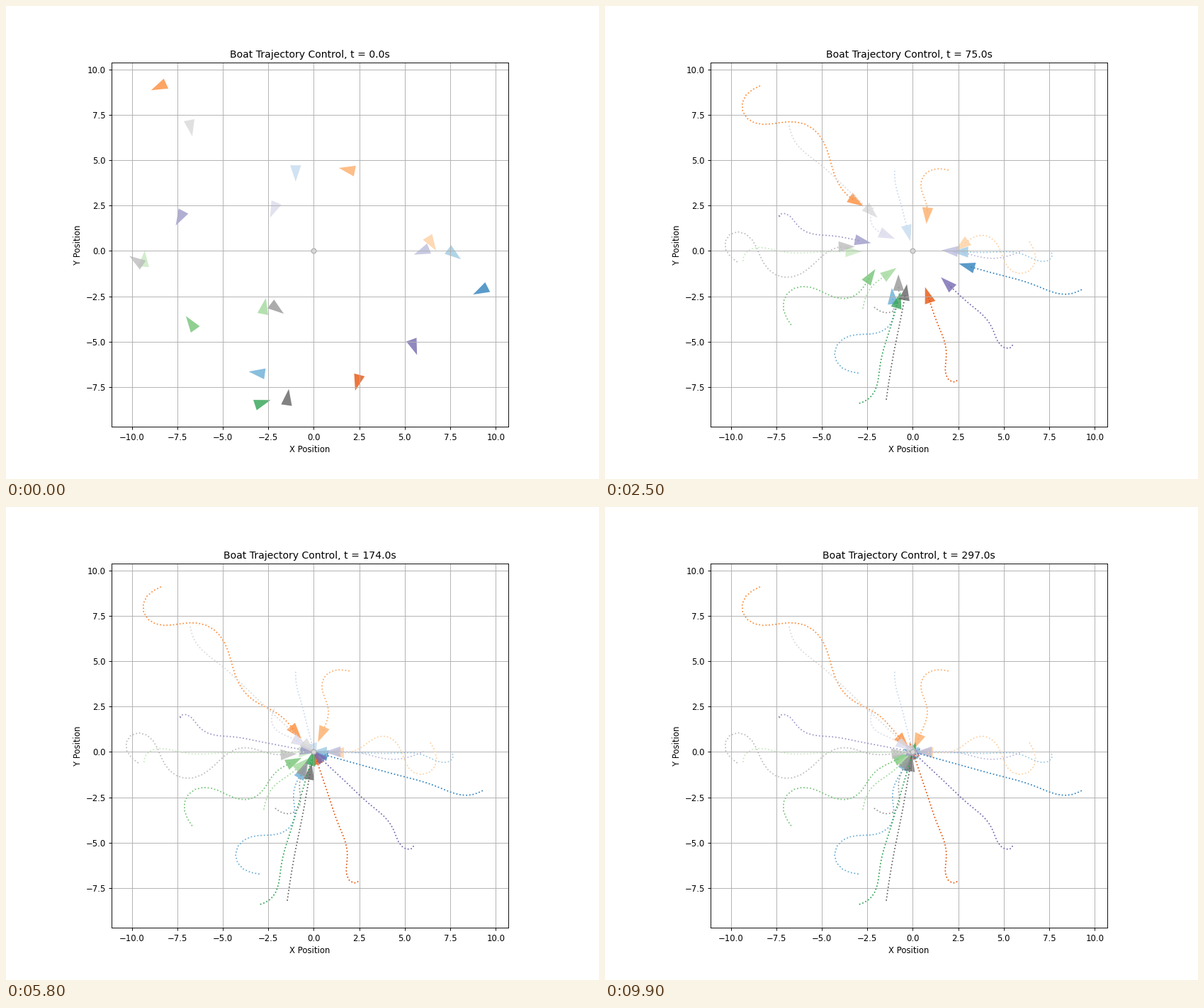
Recreate the animation shown at these times as a matplotlib script. Size 837x669 px, loop 10 s.

```python
import matplotlib.pyplot as plt
import numpy as np
from matplotlib.animation import FuncAnimation

FRAMES, INTERVAL = 100, 100
STEP, SUBSTEPS = 3.0, 30
HULL = np.array([[0.6, 0.0], [-0.3, 0.3], [-0.3, -0.3]])

# x, y, heading in degrees, and the kind of helm
DIRECT, RUDDER = True, False
BOATS = [
    (9.29, -2.13, 207, DIRECT), (-2.99, -6.73, 172, RUDDER),
    (7.61, -0.10, 323, DIRECT), (-1.00, 4.42, -90, DIRECT),
    (2.43, -7.12, 255, DIRECT), (-8.40, 9.10, -156, RUDDER),
    (1.96, 4.46, -191, RUDDER), (6.41, 0.52, -58, RUDDER),
    (-2.95, -8.40, 18, DIRECT), (-6.69, -4.08, 125, RUDDER),
    (-2.75, -3.18, 79, RUDDER), (-9.34, -0.57, 86, DIRECT),
    (5.47, -5.17, 290, DIRECT), (-7.31, 1.93, 242, DIRECT),
    (6.06, 0.02, -158, RUDDER), (-2.17, 2.39, -113, RUDDER),
    (-1.46, -8.20, 82, RUDDER), (-2.13, -3.10, -37, RUDDER),
    (-9.65, -0.61, 146, RUDDER), (-6.80, 6.91, -79, DIRECT),
]


def wrap(a):
    return (a + np.pi) % (2 * np.pi) - np.pi


def simulate():
    """Steer every boat to the origin as a damped, driven heading."""
    x, y, heading, direct = (np.array(c) for c in zip(*BOATS))
    heading = np.radians(heading.astype(float))
    bearing = np.arctan2(-y, -x)
    rate = np.zeros(len(BOATS))
    damping = np.where(direct, 0.17, 0.066)
    dt = STEP / SUBSTEPS
    log = []
    for k in range(FRAMES * SUBSTEPS):
        if k % SUBSTEPS == 0:
            log.append((x, y, heading))
        dist = np.hypot(x, y)
        bearing = bearing + wrap(np.arctan2(-y, -x) - bearing)
        error = bearing - heading
        speed = np.where(
            direct,
            0.12 * np.tanh(dist / 6.2) * (1 + np.cos(error)) / 2,
            np.minimum(0.004 * dist ** 2, 0.157))
        # a rudder only bites while the boat is moving
        gain = np.where(direct, 0.027, 0.1 * speed)
        rate = rate + (gain * error - damping * rate) * dt
        heading = heading + rate * dt
        x = x + speed * np.cos(heading) * dt
        y = y + speed * np.sin(heading) * dt
    return np.array(log).transpose(1, 2, 0)


X, Y, HEADING = simulate()

DPI = 83.7
fig, ax = plt.subplots(figsize=(837.01 / DPI, 669.01 / DPI), dpi=DPI)
ax.set_aspect("equal")
ax.set(xlim=(-11.12, 10.69), ylim=(-9.70, 10.37),
       xlabel="X Position", ylabel="Y Position")
ax.grid(True)
title = ax.set_title("")

colors = plt.get_cmap("tab20c").colors
hulls = [ax.add_patch(plt.Polygon(HULL, fc=c, ec="none", alpha=0.8))
         for c in colors]
trails = [ax.plot([], [], ":", color=c, lw=1.5)[0] for c in colors]
ax.plot(0, 0, "o", ms=6, mfc="#d6d6d6", mec="#a2a2a2", mew=0.8)


def update(k):
    for i, (hull, trail) in enumerate(zip(hulls, trails)):
        c, s = np.cos(HEADING[i, k]), np.sin(HEADING[i, k])
        hull.set_xy(HULL @ np.array([[c, s], [-s, c]]) + (X[i, k], Y[i, k]))
        trail.set_data(X[i, :k + 1], Y[i, :k + 1])
    title.set_text(f"Boat Trajectory Control, t = {k * STEP:.1f}s")
    return [*hulls, *trails, title]


anim = FuncAnimation(fig, update, frames=FRAMES, interval=INTERVAL,
                     repeat=True, repeat_delay=0, blit=False)
plt.show()
```
